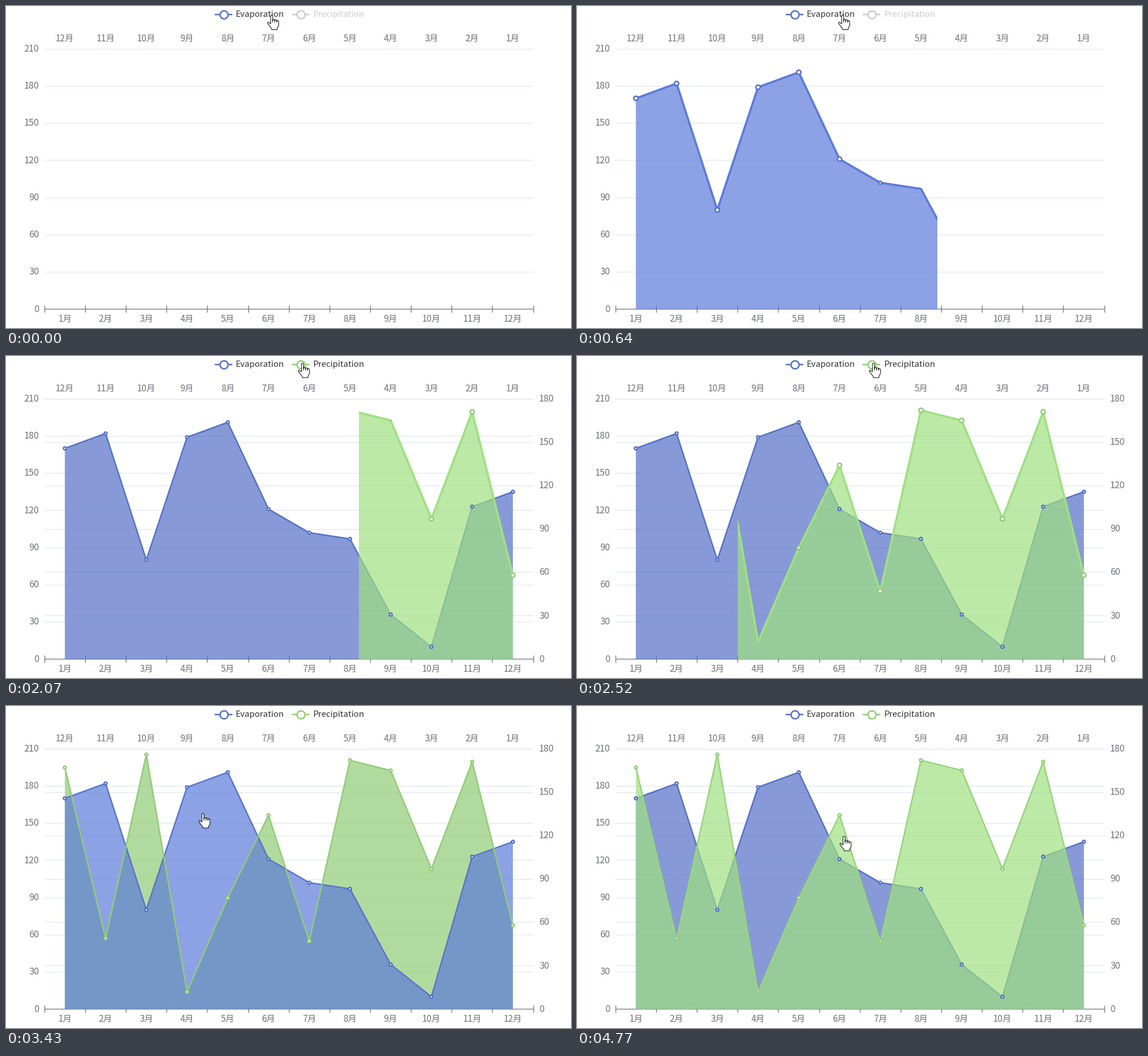
These frames come from a looping animation (991x565 px, 6310 ms). A matplotlib script:

```python
import numpy as np
import matplotlib.pyplot as plt
from matplotlib.animation import FuncAnimation
from matplotlib.patches import PathPatch
from matplotlib.path import Path
from matplotlib.transforms import Affine2D, Bbox, TransformedBbox

W, H, DPI = 991, 565, 64
LOOP, STEP = 6310, 10
PT = 72 / DPI                      # points per pixel
RATIO = 1.25                       # screen pixels per layout unit
LEFT, SPAN = 67.5, 857.3
TOP, BOTTOM = 75, 532
BLUE, GREEN = np.array([84, 112, 198]) / 255, np.array([145, 204, 117]) / 255
AXIS, SPLIT, OFF, INK = "#6e7079", "#e0e6f1", "#cccccc", "#333333"
TOGGLE = 1730                      # second series is switched on
THIN, THICK = RATIO * PT, 2 * RATIO * PT

plt.rcParams["font.family"] = "Noto Sans CJK JP"
fig = plt.figure(figsize=(W / DPI, H / DPI), dpi=DPI, facecolor="white")
ax = fig.add_axes([0, 0, 1, 1])
ax.set_xlim(0, W)
ax.set_ylim(H, 0)
ax.axis("off")

months = LEFT + SPAN * (np.arange(12) + 0.5) / 12


def to_y(value, top_value):
    return BOTTOM - (BOTTOM - TOP) * np.asarray(value) / top_value


def crisp(pos):
    """Centre of a hairline aligned to whole layout units."""
    return (np.round(2 * np.asarray(pos) / RATIO) // 2 + 0.5) * RATIO


def label(x, y, text, size=15.4, color=AXIS, ha="center"):
    return ax.text(x, y, text, size=size * PT, color=color, ha=ha, va="baseline")


def grid(top_value, x, ha):
    """Split lines and value labels of one vertical axis."""
    ticks = np.arange(0, top_value + 1, 30)
    ys = to_y(ticks, top_value)
    parts = [ax.hlines(crisp(ys[1:]), LEFT, LEFT + SPAN, colors=SPLIT, lw=THIN,
                       zorder=0, snap=False)]
    parts += [label(x, y + 4.7, str(v), 16, ha=ha) for v, y in zip(ticks, ys)]
    return parts


def legend_item(x, text, color):
    line, = ax.plot([x, x + 31], [15, 15], color=color, lw=THICK,
                    solid_capstyle="butt", snap=False)
    dot, = ax.plot([x + 15.5], [15], "o", ms=14 * PT, mfc="white", mec=color,
                   mew=THICK, snap=False)
    return line, dot, label(x + 37, 19, text, 14.9, INK, "left")


def cubic_out(p):
    return 1 - (1 - np.clip(p, 0, 1)) ** 3


def cubic_in_out(p):
    p = np.clip(p, 0, 1)
    return np.where(p < 0.5, 4 * p ** 3, 1 - 4 * (1 - p) ** 3)


class Highlight:
    """Emphasis that fades in and out over 300 ms."""

    def __init__(self, on, off=np.inf):
        self.on, self.off = on, off

    def active(self, t):
        return self.on <= t < self.off

    def level(self, t):
        return cubic_out((t - self.on) / 300) * (1 - cubic_out((t - self.off) / 300))


class Series:
    def __init__(self, values, top_value, color, z, start, inverse, legend, hover):
        self.color, self.z, self.start, self.inverse = color, z, start, inverse
        self.legend, self.hover = legend, hover
        ys = to_y(values, top_value)
        outline = np.column_stack([np.r_[months, months[-1], months[0]],
                                   np.r_[ys, BOTTOM, BOTTOM]])
        self.area = ax.add_patch(plt.Polygon(outline, lw=0, alpha=0.7))
        self.line, = ax.plot(months, ys, solid_joinstyle="bevel",
                             solid_capstyle="butt")
        self.dots = ax.scatter(months, ys, facecolors="white", edgecolors=[color],
                               zorder=30 + z)
        offset = (months - LEFT) / SPAN
        self.delay = 1000 * (1 - offset if inverse else offset)

    def update(self, t):
        age = t - self.start
        shown = age > 0
        for part in (self.area, self.line, self.dots):
            part.set_visible(shown)
        if not shown:
            return
        strong, lift = self.legend.level(t), self.hover.level(t)
        raised = self.legend.active(t)

        self.area.set_facecolor(self.color * (1 + 0.1 * max(strong, lift)))
        on_top = raised or self.hover.active(t)
        self.area.set_zorder(10.1 + self.z if on_top else 2 + self.z)
        self.line.set_color(self.color * (1 + 0.1 * strong))
        self.line.set_linewidth(THICK + THIN * strong)
        self.line.set_zorder((20 if raised else 10) + self.z)

        scale = cubic_in_out((age - self.delay) / 200)
        diameter = 2 * THICK * scale * (1 + 0.5 * strong)
        self.dots.set_sizes(diameter ** 2)
        self.dots.set_linewidths(np.where(scale > 0, THICK, 0))

        x0, x1 = LEFT - RATIO, LEFT + SPAN + RATIO
        width = (x1 - x0) * min(age / 1000, 1)
        x0, x1 = (x1 - width, x1) if self.inverse else (x0, x0 + width)
        box = TransformedBbox(Bbox.from_extents(x0, H, x1, 0), ax.transData)
        self.area.set_clip_box(box)
        self.line.set_clip_box(box)


def make_cursor():
    """Pointing hand: four rounded fingers, then palm and thumb."""
    tops, gap, r = (0, 7.3, 8.2, 9.6), 3.5, 1.8
    turn = np.linspace(np.pi, 0, 7)
    fingers = [np.column_stack([gap * k + r * np.cos(turn), top + r - r * np.sin(turn)])
               for k, top in enumerate(tops)]
    palm = [(12.3, 18), (9.8, 23), (9.6, 25.5), (0, 25.5), (-0.3, 23.5), (-7.4, 14.4),
            (-6.2, 12.2), (-r, 15.2), (-r, r)]
    knuckles = [Path([(gap * k - r, top + 1), (gap * k - r, 12.8)])
                for k, top in enumerate(tops) if k]
    shape = Path.make_compound_path(Path(np.vstack(fingers + [palm])), *knuckles)
    place = Affine2D()
    ax.add_patch(PathPatch(shape, fc="white", ec="black", lw=PT, zorder=50,
                           joinstyle="round", transform=place + ax.transData))
    return place


# Fixed parts
grid(210, 58, "right")
right_axis = grid(180, 935, "left")
for i, x in enumerate(months):
    label(x, 62, f"{12 - i}月")
    label(x, 553.5, f"{i + 1}月")
base = crisp(BOTTOM)
ax.hlines(base, LEFT, LEFT + SPAN, colors=AXIS, lw=THIN, zorder=1, snap=False)
ax.vlines(crisp(LEFT + SPAN * np.arange(13) / 12), base - 6.3, base + 6.3, colors=AXIS,
          lw=THIN, zorder=1, snap=False)
ax.hlines(564.5, 0, W, colors="#c8c8c8", lw=PT, zorder=0)
legend_item(366, "Evaporation", BLUE)
key_line, key_dot, key_text = legend_item(501, "Precipitation", GREEN)

evaporation = Series([170, 182, 80, 179, 191, 121, 102, 97, 36, 10, 123, 135], 210,
                     BLUE, 0, -20, False, Highlight(-1000, 1240), Highlight(3120, 4450))
precipitation = Series([167, 49, 176, 12, 77, 134, 47, 172, 165, 97, 171, 58], 180,
                       GREEN, 0.2, 1713, True, Highlight(TOGGLE, 2810), Highlight(4470))
cursor = make_cursor()

# Pointer stops: time, x and y of the finger tip
stops = np.array([(1000, 466, 16), (1330, 515.5, 13.5), (1890, 520, 12.5),
                  (2740, 520, 12.5), (3050, 355, 138.5), (3370, 345.5, 188.5),
                  (4130, 345.5, 188.5), (4680, 468.5, 228.5)])

# The screen refreshes every 78.3 ms and falls back in step at these times
RESYNC = (0, 90, 780, 1420, 2070, 2740, 3430, 4130, 4770)
REFRESH = 78.3


def screen_time(t):
    start = max(s for s in RESYNC if s <= t)
    return start + (t - start) // REFRESH * REFRESH


def draw(i):
    t = screen_time(i * STEP)
    enabled = t >= TOGGLE
    for part in right_axis:
        part.set_visible(enabled)
    key_line.set_color(GREEN if enabled else OFF)
    key_dot.set_markeredgecolor(GREEN if enabled else OFF)
    key_text.set_color(INK if enabled else OFF)
    evaporation.update(t)
    precipitation.update(t)
    x, y = (np.interp(t, stops[:, 0], stops[:, k]) for k in (1, 2))
    cursor.clear().translate(x, y)
    return []


anim = FuncAnimation(fig, draw, frames=LOOP // STEP, interval=STEP, repeat=True,
                     repeat_delay=0, blit=False)
plt.show()
```
